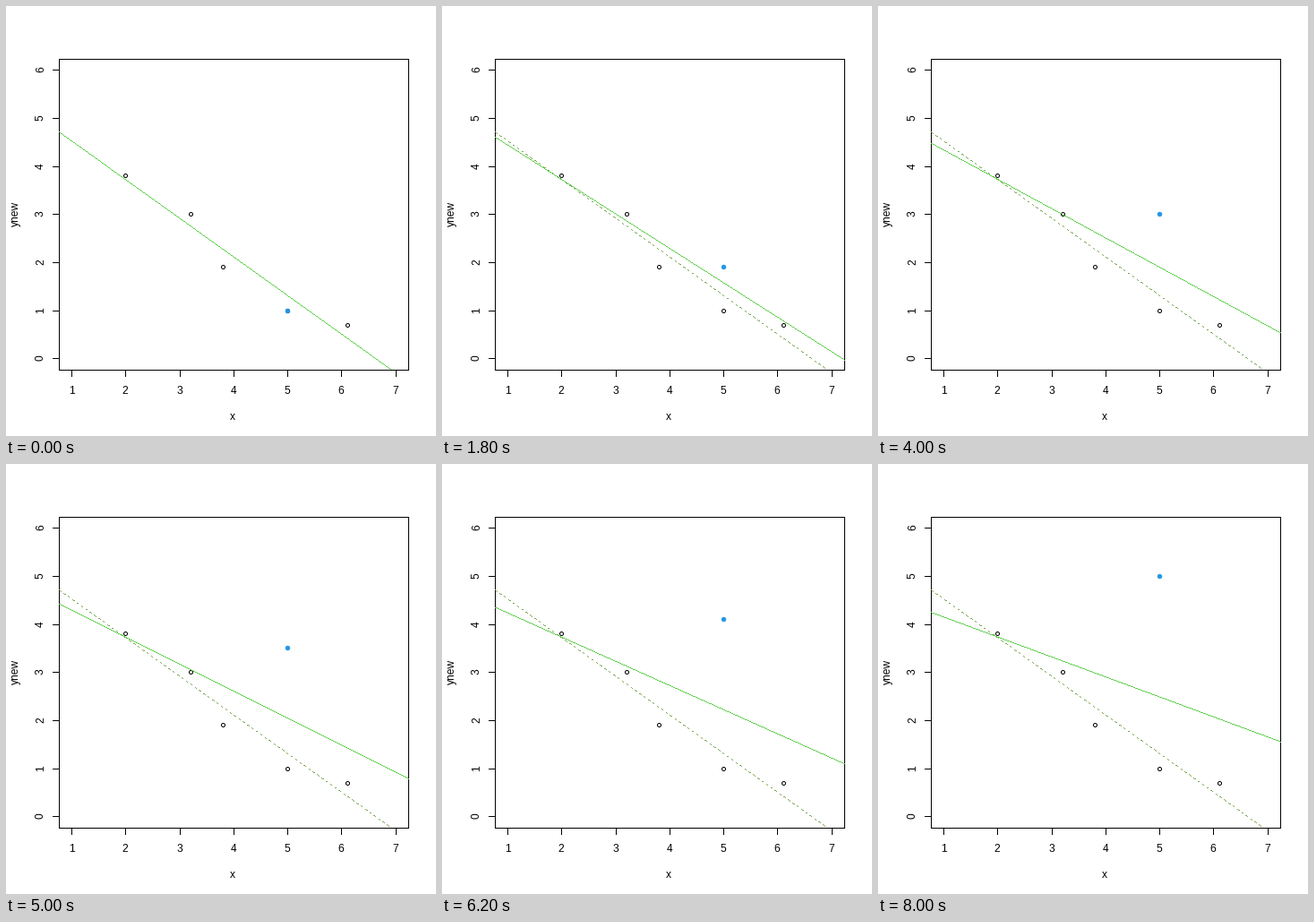
A matplotlib script for the animation above (8.2 s loop, 480 px wide and 480 px high).

```python
import numpy as np
import matplotlib.pyplot as plt
from matplotlib.animation import FuncAnimation

plt.rcParams["font.family"] = "Liberation Sans"

SIZE, DPI = 480, 80
PX = 72 / DPI                       # one pixel in points
LEFT, RIGHT, TOP, BOTTOM = 59.04, 449.76, 59.04, 406.56
X0, X1, Y0, Y1 = 0.76, 7.24, -0.24, 6.24
GREEN, FADED, BLUE = "#61D04F", "#79A951", "#2297E6"
FRAMES, STEP_MS = 41, 200

xs = np.array([2, 3.2, 3.8, 5, 6.1])
ys = np.array([3.8, 3.0, 1.9, 1.0, 0.7])
MOVED = 3                           # index of the point that rises


def col(x):
    """Pixel column of a data x value."""
    return np.floor(LEFT + (x - X0) / (X1 - X0) * (RIGHT - LEFT))


def row(y):
    """Pixel row of a data y value."""
    return np.floor(BOTTOM - (y - Y0) / (Y1 - Y0) * (BOTTOM - TOP))


l, r, t, b = (int(v) for v in (LEFT, RIGHT, TOP, BOTTOM))


def fit_pixels(y, dash=None):
    """One pixel per column along the least-squares line, optionally dashed."""
    slope, start = np.polyfit(xs, y, 1)
    cols = np.arange(l, r + 1)
    x = X0 + (cols + 0.5 - LEFT) / (RIGHT - LEFT) * (X1 - X0)
    rows = row(start + slope * x)
    keep = (rows >= t) & (rows <= b)
    if dash:
        dist = np.hypot(cols - l, rows - rows[0])
        keep &= dist % (2 * dash) < dash
    return cols[keep], rows[keep]


fig = plt.figure(figsize=(SIZE / DPI, SIZE / DPI), dpi=DPI, facecolor="white")
ax = fig.add_axes([0, 0, 1, 1])
ax.set_xlim(0, SIZE)
ax.set_ylim(SIZE, 0)
ax.axis("off")


def stroke(x, y):
    ax.plot(x, y, color="black", lw=PX, antialiased=False,
            solid_joinstyle="miter", zorder=1)


def pixels(x, y, color, zorder):
    return ax.plot(x, y, ",", color=color, antialiased=False, zorder=zorder)[0]


def label(x, y, text, rotation=0):
    ax.text(x, y, text, fontsize=12 * PX, color="black", ha="center",
            va="baseline", rotation=rotation, rotation_mode="anchor")


# Frame, ticks and labels
stroke([l, r, r, l, l], [t, t, b, b, t])
for v in range(1, 8):
    stroke([col(v)] * 2, [b, b + 7])
    label(col(v), 433, str(v))
for v in range(7):
    stroke([l - 7, l], [row(v)] * 2)
    label(42, row(v), str(v), 90)
label(253, 462, "x")
label(14, 232, "ynew", 90)

# Points and the two fitted lines
ax.plot(col(xs), row(ys), "o", ms=4 * PX, mfc="none", mec="black", mew=PX, zorder=2)
pixels(*fit_pixels(ys, dash=3), FADED, 3)
current = pixels([], [], GREEN, 4)
dot, = ax.plot([], [], "o", ms=5 * PX, mfc=BLUE, mec=BLUE, mew=0.5 * PX, zorder=5)


def draw(i):
    y = ys.copy()
    y[MOVED] += 0.1 * i
    current.set_data(*fit_pixels(y))
    dot.set_data([col(xs[MOVED])], [row(y[MOVED])])
    return current, dot


anim = FuncAnimation(fig, draw, frames=FRAMES, interval=STEP_MS,
                     repeat=True, repeat_delay=0, blit=False)
plt.show()
```
